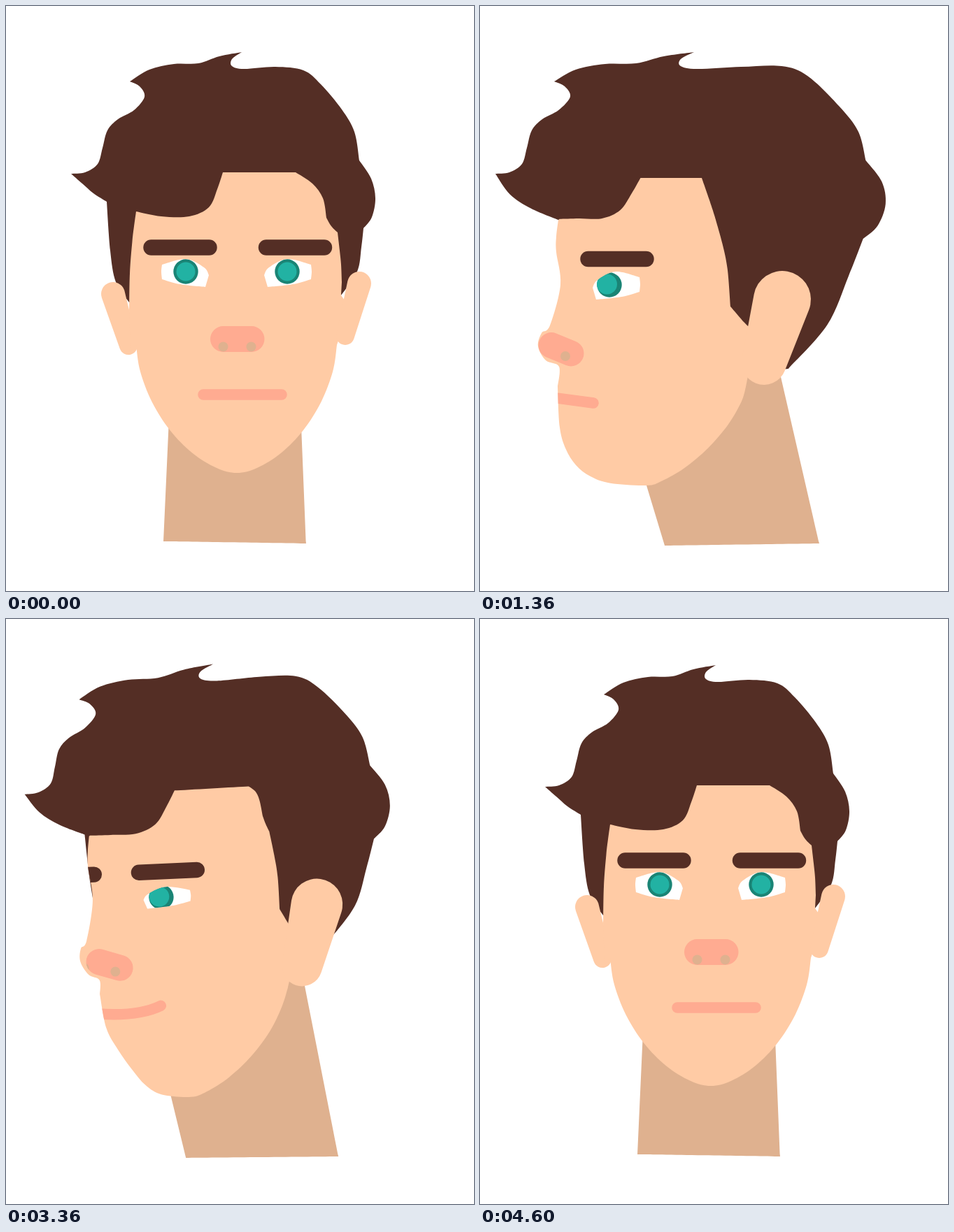
Recreate the animation shown at these times as an HTML page with a canvas. Size 669 px wide and 837 px high, loop 5 s.

```html
<!DOCTYPE html>
<html lang="en">
<head>
<meta charset="utf-8">
<title>Turning head</title>
<style>
  html, body { margin: 0; width: 100%; height: 100%; overflow: hidden; background: #fff; }
  canvas { display: block; }
</style>
</head>
<body>
<canvas id="stage" width="669" height="837"></canvas>
<script>
const ctx = document.getElementById('stage').getContext('2d');
const LOOP = 5000;
const SKIN = '#ffcba5', SHADE = '#dfb18f', HAIR = '#542e25', PINK = '#ffab91';
const TEAL = '#22b2a3', RING = '#1a8475';

const clamp = v => Math.max(0, Math.min(1, v));
const lerp = (a, b, u) => a + (b - a) * u;
const cubic = u => u < .5 ? 4 * u ** 3 : 1 - 4 * (1 - u) ** 3;
const sine = u => .5 - .5 * Math.cos(Math.PI * u);

// Points are [front x, front y, side x, side y]; the side view comes from a warp rule.
function warped(list, warp) {
  const pts = [];
  for (let i = 0; i < list.length; i += 2) {
    pts.push([list[i], list[i + 1], ...warp(list[i], list[i + 1])]);
  }
  return pts;
}

// The front of the hair slides left, the back swells out and the nape drops.
function hairSide(x, y) {
  if (x < 177) {
    const f = clamp((y - 240) / 40);
    return [x - 71 + 39 * f * f, y + 26 * Math.sqrt(f)];
  }
  const back = clamp((x - 177) / 351) ** 1.5;
  const sag = clamp((y - 221) / 97), nape = clamp((y - 318) / 96);
  const crown = Math.max(0, 1 - Math.abs(x - 450) / 50);
  return [x - 71 + 130 * back - 13 * sag - 58 * nape, y + 15 * sag + 95 * nape - 12 * crown];
}

const fringeSide = (x, y) => [
  x - 74 - .18 * (x - 186) + .25 * (301 - y),
  y + 3 + .08 * (301 - y) + .2 * Math.max(0, 222 - x)
];

function templeSide(x, y) {
  const v = ((y - 238) / 157) ** 2;
  return [317 + 41 * Math.sin(v * Math.PI / 2), 246 + 184 * v];
}

// The profile flattens into the cheek line when seen from the front.
function cheek(x, y) {
  const fy = 294 + (y - 306) * .95;
  return [176 + 10 * ((424 - fy) / 130) ** 2, fy];
}

// Each run is smooth and starts at the end of the one before.
const hair = [
  [93,240],
  [113,238, 131,226, 138,203, 145,178, 160,162, 183,149, 198,130, 191,115, 177,108],
  [205,91, 240,83, 275,82, 305,72, 337,66],
  [323,76, 323,86, 340,90, 385,87, 425,92, 450,112, 480,148, 498,180, 505,221],
  [522,247, 528,275, 523,302, 511,318],
  [508,345, 502,380, 479,414],
  [400,420], [176,424],
  [157,395, 149,350, 144,280],
  [125,268, 109,254, 93,240]
].map(run => warped(run, hairSide));

function jawPoint(a, cx, cy, left, right, drop, eLeft, eRight) {
  const c = Math.cos(a), s = Math.sin(a);
  const e = 2 / (c < 0 ? eLeft : eRight);
  return [cx + Math.sign(c) * (c < 0 ? left : right) * Math.abs(c) ** e, cy + drop * Math.abs(s) ** e];
}

const jaw = Array.from({ length: 13 }, (_, i) => {
  const a = i * Math.PI / 12;
  return [...jawPoint(a, 330, 485, 144, 143, 183, 1.7, 1.7),
          ...jawPoint(a, 238, 545, 127, 142, 141, 3, 1.45)];
});

const profile = warped(
  [113,516, 94,507, 83,487, 88,468, 100,457, 115,399, 109,352, 109,330, 112,306], cheek
).map(([sx, sy, x, y]) => [x, y, sx, sy]);

const face = [
  warped([186,294], fringeSide),
  warped([222,301, 262,301, 290,288, 302,262, 310,238], fringeSide),
  warped([414,238], templeSide),
  warped([438,254, 453,275, 458,303], templeSide),
  warped([465,315, 474,324], templeSide),
  warped([477,350, 479,370, 480,395], templeSide),
  [[479,414, 377,452]], [[492,432, 395,470]], [jaw[0]],
  jaw.slice(1),
  profile
];

const neck = [[[233,590, 209,590]], [[418,500, 423,500]], [[429,769, 485,769]], [[225,766, 264,772]]];
const eye = [[-33,5], [-26,-6, 0,-18, 34,-10], [35,0, 34,11], [9,18, -28,22]]
  .map(run => warped(run, (x, y) => [x, y * .65]));

// Parts lag behind the turn by raising it to a power.
const even = () => 1;
const hairLag = x => 1 + 2.3 * clamp((x - 330) / 130);
function faceLag(x, y) {
  const temple = clamp((x - 176) / 240) ** 2 * clamp((520 - y) / 280);
  const chin = clamp((y - 424) / 150) * clamp((330 - x) / 100);
  return .9 + 1.7 * temple + 1.3 * chin;
}

function track(keys, t, ease) {
  for (let i = 1; i < keys.length; i++) {
    const [t0, a] = keys[i - 1], [t1, b] = keys[i];
    if (t < t1) return lerp(a, b, ease((t - t0) / (t1 - t0)));
  }
  return keys[keys.length - 1][1];
}
const turnKeys = [[0, 0], [600, 1], [3065, 1], [3905, 0]];
const tiltKeys = [[0, 0], [640, -3.2], [1160, 0], [1720, 0], [2240, 6], [2840, 6], [3560, -4.4], [3900, 0]];
const smileKeys = [[0, 0], [1720, 0], [2240, 1], [3200, 1], [3640, 0]];

function outline(shape, turn, lag = even) {
  const runs = shape.map(run => run.map(([x, y, sx, sy]) => {
    const u = turn ** lag(x, y);
    return [lerp(x, sx, u), lerp(y, sy, u)];
  }));
  const path = new Path2D();
  let last = runs[0][0];
  path.moveTo(...last);
  for (const run of runs.slice(1)) {
    const p = [last, ...run];
    for (let i = 0; i < p.length - 1; i++) {
      const a = p[i - 1] || p[i], b = p[i], c = p[i + 1], d = p[i + 2] || c;
      path.bezierCurveTo(
        b[0] + (c[0] - a[0]) / 6, b[1] + (c[1] - a[1]) / 6,
        c[0] - (d[0] - b[0]) / 6, c[1] - (d[1] - b[1]) / 6, c[0], c[1]);
    }
    last = p[p.length - 1];
  }
  path.closePath();
  return path;
}

// Two discs joined by their outer tangents.
function capsule(x0, y0, r0, x1, y1, r1) {
  const a = Math.atan2(y1 - y0, x1 - x0);
  const b = Math.acos((r0 - r1) / Math.hypot(x1 - x0, y1 - y0));
  const path = new Path2D();
  path.arc(x0, y0, r0, a + b, a - b + 2 * Math.PI);
  path.arc(x1, y1, r1, a - b, a + b);
  path.closePath();
  return path;
}

function fill(path, color) {
  ctx.fillStyle = color;
  ctx.fill(path);
}

function disc(x, y, r, color) {
  const path = new Path2D();
  path.arc(x, y, r, 0, 2 * Math.PI);
  fill(path, color);
}

function clipped(path, draw) {
  ctx.save();
  ctx.clip(path);
  draw();
  ctx.restore();
}

function drawNearEar(turn) {
  const m = (a, b) => lerp(a, b, turn);
  fill(capsule(m(505, 432), m(397, 420), m(17, 41), m(485, 406), m(472, 510), m(13, 32)), SKIN);
}

function drawFarEar(turn) {
  const dx = 14 * turn;
  fill(capsule(153 + dx, 412, 17, 175 + dx, 486, 13), SKIN);
}

function drawEye(x, y, flip, turn, smile) {
  ctx.save();
  ctx.translate(x, y);
  ctx.scale(flip, 1);
  const white = outline(eye, smile);
  fill(white, '#fff');
  clipped(white, () => {
    disc(-9 * turn, turn, 17.7, RING);
    disc(-12.5 * turn, 0, 13.5 + turn, TEAL);
  });
  ctx.restore();
}

function drawBrow(x, y) {
  fill(capsule(x, y, 11.2, x + 83, y, 11.2), HAIR);
}

function drawNose(turn) {
  const u = turn ** .75;
  const m = (a, b) => lerp(a, b, u);
  const nose = capsule(m(310.5, 102), m(476.5, 485.5), 18.5, m(351, 130), m(476.5, 497), 18.5);
  fill(nose, PINK);
  clipped(nose, () => {
    disc(m(310.5, 77), m(487.5, 493), 7, SHADE);
    disc(m(350.5, 122), m(487.5, 501), 7, SHADE);
  });
}

function drawMouth(turn, smile) {
  const u = turn ** 1.1;
  const x0 = lerp(282, 50, u), y0 = lerp(556, 553, u);
  const x1 = lerp(394, 162, u), y1 = lerp(556, 568, u);
  ctx.lineCap = 'round';
  ctx.lineWidth = 15.5;
  ctx.strokeStyle = PINK;
  ctx.beginPath();
  ctx.moveTo(x0, y0);
  ctx.quadraticCurveTo((x0 + x1) / 2 + 34 * smile, (y0 + y1) / 2 + 13 * smile,
    x1 + 13 * smile, y1 - 21 * smile);
  ctx.stroke();
}

function draw(t) {
  const turn = track(turnKeys, t, cubic);
  const tilt = track(tiltKeys, t, sine) * Math.PI / 180;
  const smile = track(smileKeys, t, sine);
  const px = 310 - 45 * turn, py = 470 - 60 * turn;

  ctx.fillStyle = '#fff';
  ctx.fillRect(0, 0, 669, 837);
  fill(outline(neck, turn), SHADE);

  ctx.save();
  ctx.translate(px, py);
  ctx.rotate(tilt);
  ctx.translate(-px, -py);
  const skin = outline(face, turn, faceLag);
  fill(outline(hair, turn, hairLag), HAIR);
  drawFarEar(turn);
  fill(skin, SKIN);
  drawNearEar(turn);
  clipped(skin, () => {
    const eyeY = 380 + 18 * turn, browY = 345.5 + 16.5 * turn;
    drawEye(402 - 208 * turn, eyeY, 1, turn, smile);
    drawEye(257 - 215 * turn, eyeY, -1, turn, smile);
    drawBrow(372 - 217.5 * turn, browY);
    drawBrow(207.5 - 196.5 * turn, browY);
    drawNose(turn);
    drawMouth(turn, smile);
  });
  ctx.restore();
}

const start = performance.now();
function tick() {
  draw((performance.now() - start) % LOOP);
  requestAnimationFrame(tick);
}
tick();
</script>
</body>
</html>
```
